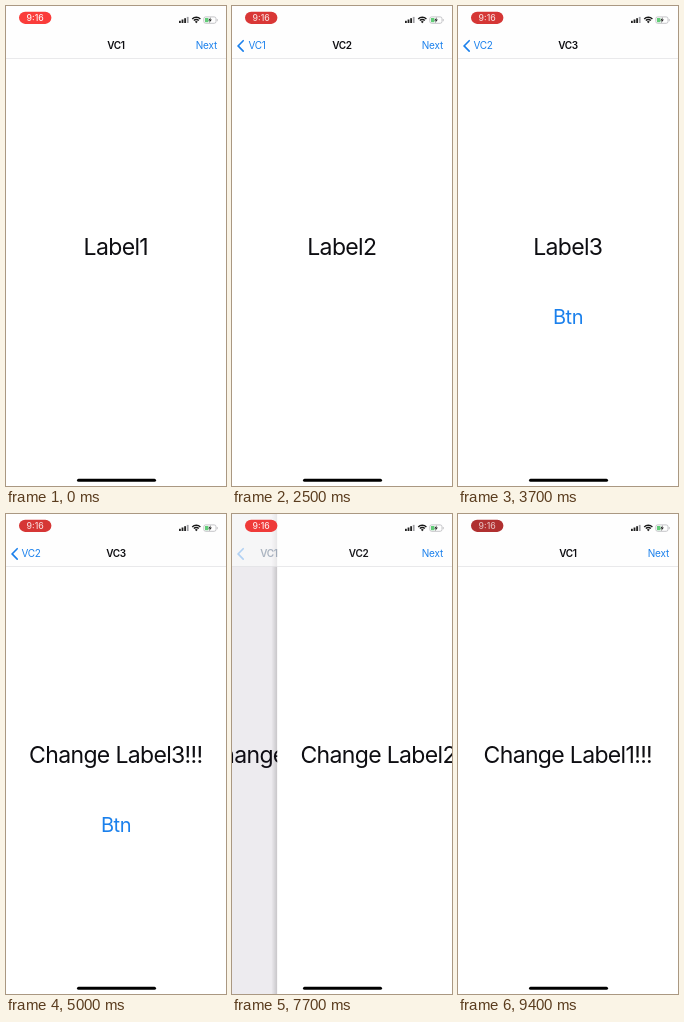
An HTML page with a canvas for the animation above (9500 ms loop, 220 by 480 pixels).

```html
<!DOCTYPE html>
<html lang="en">
<head>
<meta charset="utf-8">
<title>Navigation stack</title>
<style>
html, body { margin: 0; width: 220px; height: 480px; overflow: hidden; background: #fff; }
canvas { display: block; width: 220px; height: 480px; }
</style>
</head>
<body>
<canvas id="stage"></canvas>
<script>
const W = 220, H = 480, BAR = 52, LOOP = 9500, STEP = 100;
const BLUE = '#1b80ec', INK = '#0e0e12';
const canvas = document.getElementById('stage');
const ctx = canvas.getContext('2d');
const dpr = window.devicePixelRatio || 1;
canvas.width = W * dpr;
canvas.height = H * dpr;

const CHANGE = 4500;
// Each move goes between two screens of the stack.
const moves = [
  { at: 1220, from: 1, to: 2 },
  { at: 2673, from: 2, to: 3 },
  { at: 6490, from: 3, to: 2 },
  { at: 7654, from: 2, to: 1 }
];
// Brightness of the recording pill: time, level.
const pulse = [[0, 1], [1400, .85], [2900, .5], [5000, .52], [6600, .65], [7700, .85], [8600, .6], [9400, 0]];

const clamp = v => Math.max(0, Math.min(1, v));
const mix = (a, b, k) => a + (b - a) * k;

// Critically damped spring, settled after half a second
function spring(ms) {
  if (ms <= 0) return 0;
  if (ms >= 500) return 1;
  const w = ms * .01826;
  return 1 - (1 + w) * Math.exp(-w);
}

function level(t) {
  for (let i = 1; i < pulse.length; i++) {
    const [t0, a] = pulse[i - 1], [t1, b] = pulse[i];
    if (t <= t1) return mix(a, b, (1 - Math.cos(Math.PI * (t - t0) / (t1 - t0))) / 2);
  }
  return pulse[pulse.length - 1][1];
}

function text(str, x, y, size, color, { weight = 400, align = 'center', gap = 0, alpha = 1 } = {}) {
  if (alpha <= .01) return;
  ctx.globalAlpha = alpha;
  ctx.font = `${weight} ${size}px Inter, "Liberation Sans", sans-serif`;
  ctx.letterSpacing = gap + 'px';
  ctx.textAlign = align;
  ctx.fillStyle = color;
  ctx.fillText(str, x, y);
  ctx.globalAlpha = 1;
}

function pill(x, y, w, h, color) {
  ctx.fillStyle = color;
  ctx.beginPath();
  ctx.roundRect(x, y, w, h, h / 2);
  ctx.fill();
}

function screen(n, x, t) {
  ctx.fillStyle = '#fff';
  ctx.fillRect(x, 0, W, H);
  const label = t >= CHANGE ? `Change Label${n}!!!` : `Label${n}`;
  text(label, x + 109.8, 249, 23, INK, { gap: -.66 });
  if (n === 3) {
    const held = t >= CHANGE - 100 && t < CHANGE;
    const alpha = held ? .3 : t >= CHANGE ? mix(.3, 1, clamp((t - CHANGE) / 450)) : 1;
    text('Btn', x + 110, 318, 20, BLUE, { gap: -.4, alpha });
  }
}

function chevron(alpha) {
  if (alpha <= .01) return;
  ctx.globalAlpha = alpha;
  ctx.strokeStyle = BLUE;
  ctx.lineWidth = 1.6;
  ctx.lineCap = 'round';
  ctx.beginPath();
  ctx.moveTo(11.2, 34.7);
  ctx.lineTo(6.1, 39.9);
  ctx.lineTo(11.2, 45.1);
  ctx.stroke();
  ctx.globalAlpha = 1;
}

const title = (n, x, alpha) => text('VC' + n, x, 43.4, 10, INK, { weight: 600, gap: -.3, alpha });
const back = (n, x, alpha) => text('VC' + n, x, 43.4, 10, BLUE, { gap: -.25, alpha });
const next = alpha => text('Next', 211, 43.4, 10, BLUE, { align: 'right', gap: -.2, alpha });

function stillBar(n) {
  title(n, 110, 1);
  if (n > 1) {
    chevron(1);
    back(n - 1, 25, 1);
  }
  if (n < 3) next(1);
}

function movingBar(low, p, push) {
  const high = low + 1;
  if (push) {
    title(low, 110 - 85 * p, 1 - p);
    back(low, 110 - 85 * p, p);
    title(high, 214 - 104 * p, clamp(p * 1.15));
    if (low > 1) back(low - 1, 25, clamp(1 - 2.5 * p));
    chevron(low > 1 ? 1 : clamp(p * 1.3));
    next(low === 1 ? 1 - .8 * p * (1 - p) : (1 - p) ** 2);
  } else {
    const lag = p ** 1.24;
    back(low, 25 + 85 * lag, (1 - p) ** 8);
    title(low, 25 + 85 * lag, clamp(p * 1.1));
    title(high, 110 + 118 * lag, 1 - p * p);
    if (low > 1) back(low - 1, 25, clamp(2.5 * p - 1.5));
    chevron(low > 1 ? 1 - .8 * p * (1 - p) : (1 - p) ** 5);
    next(low === 1 ? 1 : p ** 3);
  }
}

function shade(edge, strength) {
  const g = ctx.createLinearGradient(edge - 6, 0, edge, 0);
  g.addColorStop(0, 'rgba(0,0,0,0)');
  g.addColorStop(1, `rgba(0,0,0,${strength})`);
  ctx.fillStyle = g;
  ctx.fillRect(edge - 6, 0, 6, H);
}

function statusBar(t) {
  const k = level(t);
  const c = [mix(176, 250, k), mix(48, 60, k), mix(48, 58, k)].map(Math.round);
  pill(13, 5.7, 32.4, 12.2, `rgb(${c})`);
  text('9:16', 29.2, 14.9, 8.7, '#fff', { weight: 500, alpha: mix(.65, .92, k) });

  for (let i = 0; i < 4; i++) {
    const h = 2.2 + i * 1.3;
    ctx.fillStyle = i < 3 ? '#222' : '#a0a0a4';
    ctx.fillRect(173 + i * 2.6, 17 - h, 1.8, h);
  }

  ctx.strokeStyle = ctx.fillStyle = '#181818';
  ctx.lineCap = 'butt';
  ctx.lineWidth = 1.4;
  for (const r of [5.8, 3.5]) {
    ctx.beginPath();
    ctx.arc(190.3, 17, r, -Math.PI * .75, -Math.PI * .25);
    ctx.stroke();
  }
  ctx.beginPath();
  ctx.moveTo(190.3, 17.2);
  ctx.arc(190.3, 17.2, 2, -Math.PI * .75, -Math.PI * .25);
  ctx.fill();

  ctx.strokeStyle = '#b8b8bc';
  ctx.lineWidth = .8;
  ctx.beginPath();
  ctx.roundRect(197.8, 10.9, 12.2, 6.4, 1.8);
  ctx.stroke();
  ctx.fillStyle = '#b8b8bc';
  ctx.fillRect(210.8, 13, .8, 2.2);
  ctx.fillStyle = '#62cc78';
  ctx.fillRect(199, 12, 3.4, 4.2);
  ctx.fillStyle = '#222';
  ctx.beginPath();
  for (const [x, y] of [[204.8, 11.2], [202.2, 14.5], [203.8, 14.5], [203.2, 17.1], [205.9, 13.6], [204.2, 13.6]]) ctx.lineTo(x, y);
  ctx.fill();
}

function draw(t) {
  ctx.setTransform(dpr, 0, 0, dpr, 0, 0);
  let top = 1, move = null, p = 0;
  for (const m of moves) {
    const k = spring(t - m.at);
    if (k >= 1) top = m.to;
    else if (k > 0) { move = m; p = k; }
  }

  if (move) {
    const push = move.to > move.from;
    const low = Math.min(move.from, move.to);
    const cover = push ? p : 1 - p;
    const edge = W * (1 - cover);
    screen(low, -66 * cover, t);
    ctx.fillStyle = `rgba(30,5,50,${.1 * cover})`;
    ctx.fillRect(0, 0, W, H);
    shade(edge, (push ? .04 : .2) * cover);
    screen(low + 1, edge, t);
  } else {
    screen(top, 0, t);
  }

  ctx.fillStyle = 'rgba(254,254,254,.6)';
  ctx.fillRect(0, 0, W, BAR);
  ctx.fillStyle = '#e4e4e6';
  ctx.fillRect(0, BAR, W, .8);
  if (move) movingBar(Math.min(move.from, move.to), p, move.to > move.from);
  else stillBar(top);

  statusBar(t);
  pill(71, 472.7, 79, 3, '#000');
}

const start = performance.now();
function frame() {
  const t = (performance.now() - start) % LOOP;
  draw(Math.floor(t / STEP) * STEP);
  requestAnimationFrame(frame);
}
frame();
</script>
</body>
</html>
```
